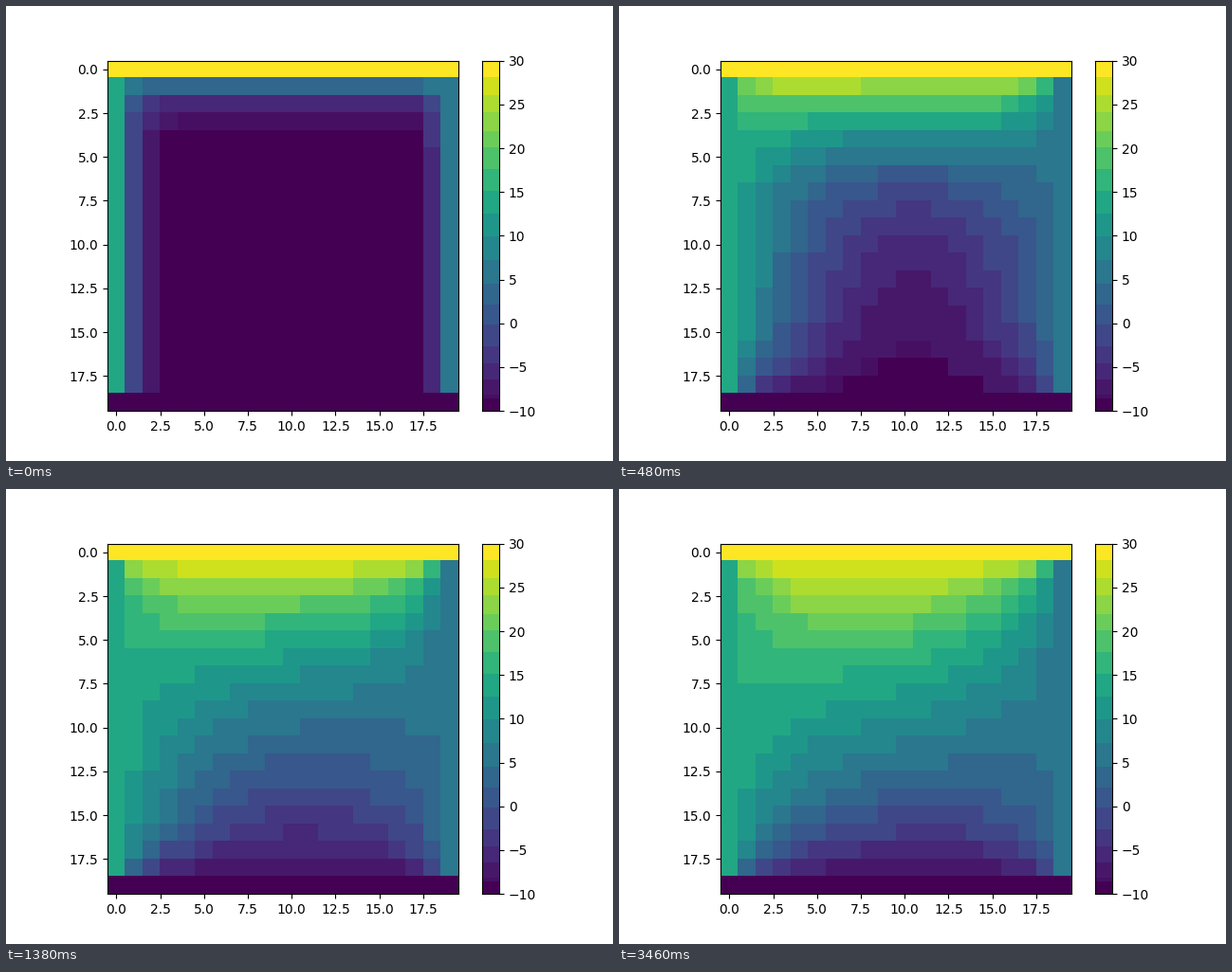
A matplotlib script for the animation above (8.49 s loop, 640 by 480 pixels).

```python
import numpy as np
import matplotlib.pyplot as plt
from matplotlib.animation import FuncAnimation
from matplotlib.colors import BoundaryNorm, ListedColormap
from matplotlib.lines import TICKDOWN, TICKLEFT, TICKRIGHT, Line2D

W, H, DPI = 640, 480, 100
N, SWEEPS = 20, 174
LOOP_MS, TICK_MS, SWEEP_MS = 8490, 10, 20
LOW, HIGH = -10, 30

# Plot box and colour bar in pixels, measured from the lower left
LEFT, BOTTOM, SIDE = 107.2, 52.8, 369.6
BAR_LEFT, BAR_WIDTH = 501.6, 18.48
PAD = 7 * DPI / 72

# Temperatures at which the colour steps
LEVELS = [LOW, -8.6, -8.25, -6.5, -4.67, -2.7, -0.24, 2.03, 4.5, 7.2, 9.9,
          12.5, 15.1, 17.6, 20, 21.9, 24.1, 26, 28.1, HIGH]


def relax():
    """Plate with fixed edges, relaxed by in-place sweeps; one grid per sweep."""
    t = np.full((N, N), float(LOW))
    t[:, 0], t[:, -1] = 15, 5
    t[0], t[-1] = HIGH, LOW
    grids = []
    for _ in range(SWEEPS):
        for r in range(1, N - 1):
            for c in range(1, N - 1):
                t[r, c] = (t[r - 1, c] + t[r + 1, c] + t[r, c - 1] + t[r, c + 1]) / 4
        grids.append(t.copy())
    return grids


def stepped_viridis():
    mids = (np.array(LEVELS[:-1]) + LEVELS[1:]) / 2
    mids[0], mids[-1] = LOW, HIGH
    return ListedColormap(plt.get_cmap("viridis")((mids - LOW) / (HIGH - LOW)))


def box(x, width):
    ax = fig.add_axes([x / W, BOTTOM / H, width / W, SIDE / H])
    ax.set(xticks=[], yticks=[])
    return ax


def ticks(xs, ys, labels, marker, dx, dy, ha, va):
    xs, ys = np.broadcast_arrays(xs, ys)
    fig.add_artist(Line2D(xs / W, ys / H, ls="none", marker=marker,
                          ms=3.5, mew=0.8, color="black"))
    for x, y, label in zip(xs, ys, labels):
        fig.text((x + dx) / W, (y + dy) / H, label, ha=ha, va=va)


plt.rcParams["font.family"] = "DejaVu Sans"
fig = plt.figure(figsize=(W / DPI, H / DPI), dpi=DPI)
cmap = stepped_viridis()
style = dict(cmap=cmap, norm=BoundaryNorm(LEVELS, cmap.N, clip=True),
             interpolation="nearest", aspect="auto")

grids = relax()
plate = box(LEFT, SIDE).imshow(grids[0], **style)
bar = np.linspace(HIGH, LOW, 740)[:, None]
box(BAR_LEFT, BAR_WIDTH).imshow(bar, **style)

marks = np.arange(0, 18, 2.5)
names = [f"{m:.1f}" for m in marks]
offsets = (marks + 0.5) * SIDE / N
ticks(LEFT + offsets, BOTTOM, names, TICKDOWN, 0, -PAD, "center", "top")
ticks(LEFT, BOTTOM + SIDE - offsets, names, TICKLEFT, -PAD, 0,
      "right", "center_baseline")

degrees = np.arange(LOW, HIGH + 1, 5)
ticks(BAR_LEFT + BAR_WIDTH, BOTTOM + (degrees - LOW) * SIDE / (HIGH - LOW),
      [str(d).replace("-", "\u2212") for d in degrees], TICKRIGHT, PAD, 0,
      "left", "center_baseline")


def draw(i):
    plate.set_data(grids[min(i * TICK_MS // SWEEP_MS, SWEEPS - 1)])
    return [plate]


anim = FuncAnimation(fig, draw, frames=LOOP_MS // TICK_MS, interval=TICK_MS,
                     repeat=True, repeat_delay=0, blit=False)
plt.show()
```
